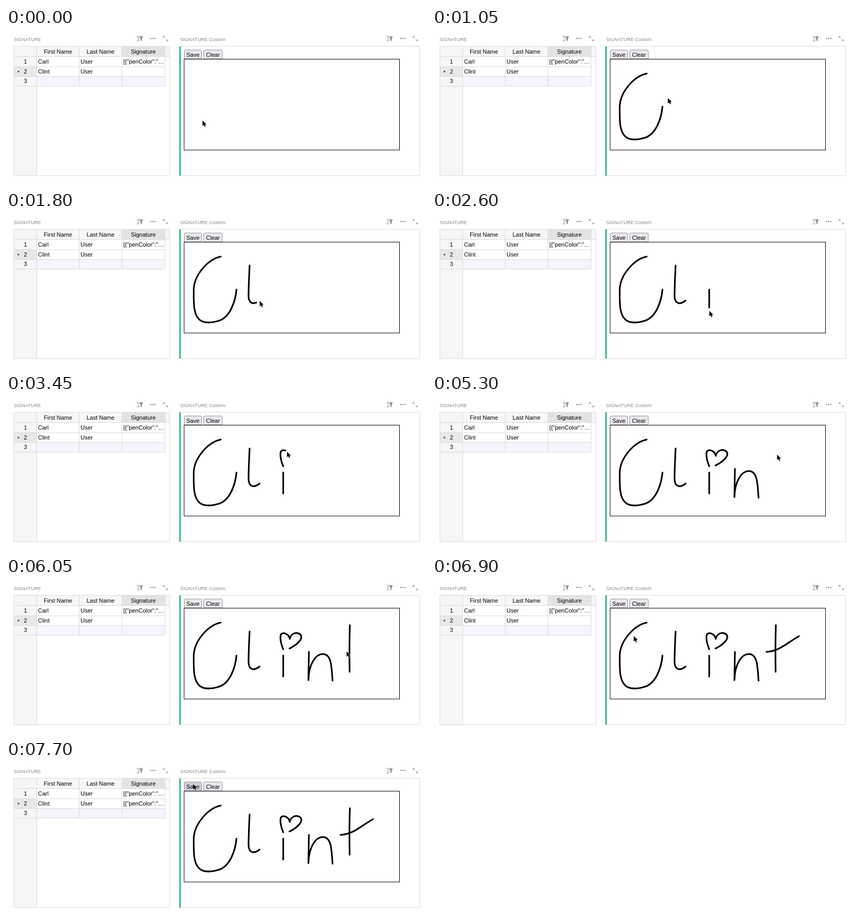
Recreate the animation shown at these times as an HTML page. Size 800x296 px, loop 7900 ms.

```html
<!DOCTYPE html>
<html lang="en">
<head>
<meta charset="utf-8">
<title>Signature</title>
<style>
  html, body { margin: 0; width: 100%; height: 100%; overflow: hidden; background: #fff; }
  svg { display: block; }
  text { font: 11px "Liberation Sans", Arial, sans-serif; fill: #000; }
  .mid { text-anchor: middle; }
  .title { font-size: 9px; fill: #87878f; }
  .line { fill: none; stroke: #d9d9d9; }
  .btn { fill: #e9e9ed; stroke: #8f8f9d; }
  .icon { fill: none; stroke: #87878f; }
  #ink path { fill: none; stroke: #000; stroke-width: 3.1; stroke-linecap: round; stroke-linejoin: round; }
</style>
</head>
<body>
<svg width="800" height="296" viewBox="0 0 800 296">
  <defs>
    <g id="tools" class="icon">
      <path d="M0 16H5M1 19H5M2 22H5M0 24.5H5"/>
      <path d="M5.5 16.5H11.5L9.3 20V24.5L7.7 23.5V20Z" fill="#87878f" stroke-width=".8"/>
      <path d="M27 20h.01M30.8 20h.01M34.6 20h.01" stroke-width="2.4" stroke-linecap="round"/>
      <path d="M50.5 19V16H53.5M50.5 16L53.8 19.3M59 21.5V24.5H56M59 24.5L55.7 21.2" stroke-width=".9"/>
    </g>
  </defs>

  <text class="title" x="14.7" y="24.6">SIGNATURE</text>
  <text class="title" x="331.7" y="24.6" letter-spacing=".06">SIGNATURE Custom</text>
  <use href="#tools" x="249"/>
  <use href="#tools" x="724.8"/>

  <rect x="15" y="35" width="297" height="19" fill="#f7f7f7"/>
  <rect x="15" y="35" width="43" height="247" fill="#f6f6f6"/>
  <rect x="15" y="74" width="43" height="19" fill="#e8e8e8"/>
  <rect x="221" y="35" width="82" height="19" fill="#e3e3e3"/>
  <rect x="59" y="93" width="244" height="18" fill="#f6f5ff"/>
  <path class="line" d="M15 54.5H312M15 74H303M15 92.5H303M15 111H303M58.5 35V282M139.5 35V111M221 35V111M303 35V111"/>
  <rect class="line" x="15" y="35" width="297" height="247"/>
  <path d="M22.5 81.3L26 83.2L22.5 85.1Z" fill="#222"/>
  <g id="cells"></g>

  <rect class="line" x="332" y="35" width="456" height="247"/>
  <rect x="330.2" y="35" width="2.5" height="247" fill="#16b378"/>
  <rect class="btn" id="save" x="339.5" y="42" width="33" height="17" rx="2.5"/>
  <rect class="btn" x="376.5" y="42" width="35.5" height="17" rx="2.5"/>
  <text class="mid" x="356" y="54.8">Save</text>
  <text class="mid" x="394.2" y="54.8">Clear</text>
  <rect x="339.2" y="59.5" width="410.3" height="173.5" fill="#fff" stroke="#000"/>

  <g id="ink"></g>
  <path id="cursor" d="M0 0V11.6L2.7 9.1L4.6 13.3L6.6 12.4L4.8 8.3H8.4Z" stroke="#fff" stroke-width="1.2" paint-order="stroke"/>
</svg>

<script>
const LOOP = 7900, STEP = 50;
const SAVED_AT = 7650;
const NS = "http://www.w3.org/2000/svg";
const $ = id => document.getElementById(id);

function add(parent, tag, attrs, content = "") {
  const el = document.createElementNS(NS, tag);
  for (const k in attrs) el.setAttribute(k, attrs[k]);
  el.textContent = content;
  return parent.appendChild(el);
}

const label = (x, y, s, cls = "") => add($("cells"), "text", { x, y, class: cls }, s);
const value = '[{"penColor":"…';
const rows = [68.3, 87.2, 105.4];
label(99, 49, "First Name", "mid");
label(180, 49, "Last Name", "mid");
label(261.5, 49, "Signature", "mid");
rows.forEach((y, i) => label(37, y, i + 1, "mid"));
["Carl", "Clint"].forEach((name, i) => {
  label(61, rows[i], name);
  label(142, rows[i], "User");
});
label(223.5, rows[0], value);
const saved = label(223.5, rows[1], value);

// Pen journey: start ms, end ms, path, 1 when the pen is down.
const journey = [
  [100, 300, "M374 176C395 162 420 141 438 130L439 150"],
  [300, 800, "M439 150C437 172 427 204 404 210C390 214 377 214 369 208C357 198 357.5 178 357.5 152C357.5 122 385 92 409 87", 1],
  [800, 850, "M409 87L415 86"],
  [950, 1050, "M415 86L449 133"],
  [1050, 1200, "M449 133L464 104"],
  [1200, 1800, "M464 104C463 125 462 145 462 162C462 177 472 180 483 171", 1],
  [1800, 1900, "M483 171Q500 150 504 127"],
  [2050, 2250, "M504 127Q516 136 528 150"],
  [2250, 2600, "M528 150V190", 1],
  [2650, 2800, "M528 190V139"],
  [2850, 3600, "M528 138C524 128 521.5 117 523.5 110C526 105 538 107 540.5 118", 1],
  [3600, 4150, "M540.5 118C543 107 554 104 561 110C568 119 550 132 540 136.5", 1],
  [4150, 4250, "M540 136.5L531 138"],
  [4250, 4400, "M531 138Q555 141 577 142"],
  [4450, 5200, "M577 143L576 197C577 165 590 147 604 147C620 148 620 170 622 198", 1],
  [5200, 5300, "M622 198L657 115"],
  [5300, 5400, "M657 115L655 91"],
  [5400, 5700, "M655 92C654 120 654 150 654.5 181", 1],
  [5700, 5750, "M654.5 181L655 188"],
  [5900, 6000, "M655 188L637 143"],
  [6000, 6300, "M637 143C662 141 670 130 699 113", 1],
  [6300, 6350, "M699 113L702 111"],
  [6550, 6900, "M702 111C620 195 480 200 384 112"],
  [6900, 7250, "M384 112Q366 70 356 45"]
].map(([from, to, d, down]) => {
  const el = add($("ink"), "path", { d });
  const len = el.getTotalLength();
  if (!down) el.remove();
  return { from, to, el, len, down };
});

const progress = (t, s) => Math.min(1, Math.max(0, (t - s.from) / (s.to - s.from)));

function draw(t) {
  let current = journey[0];
  for (const s of journey) {
    if (t >= s.from) current = s;
    if (!s.down) continue;
    // Ink trails the pointer by one step.
    const p = progress(t - STEP, s);
    s.el.style.display = p ? "" : "none";
    s.el.style.strokeDasharray = `${p * s.len + (p === 1 ? 1 : 0)} ${s.len + 9}`;
  }
  const at = current.el.getPointAtLength(progress(t, current) * current.len);
  $("cursor").setAttribute("transform", `translate(${at.x + .3} ${at.y + .7}) scale(.9)`);
  $("save").style.fill = t < 7200 ? "#e9e9ed" : t >= 7350 && t < 7500 ? "#b1b1b9" : "#d0d0d7";
  saved.style.display = t >= SAVED_AT ? "" : "none";
}

const start = performance.now();
function tick() {
  const t = (performance.now() - start) % LOOP;
  draw(Math.floor(t / STEP) * STEP);
  requestAnimationFrame(tick);
}
tick();
</script>
</body>
</html>
```
